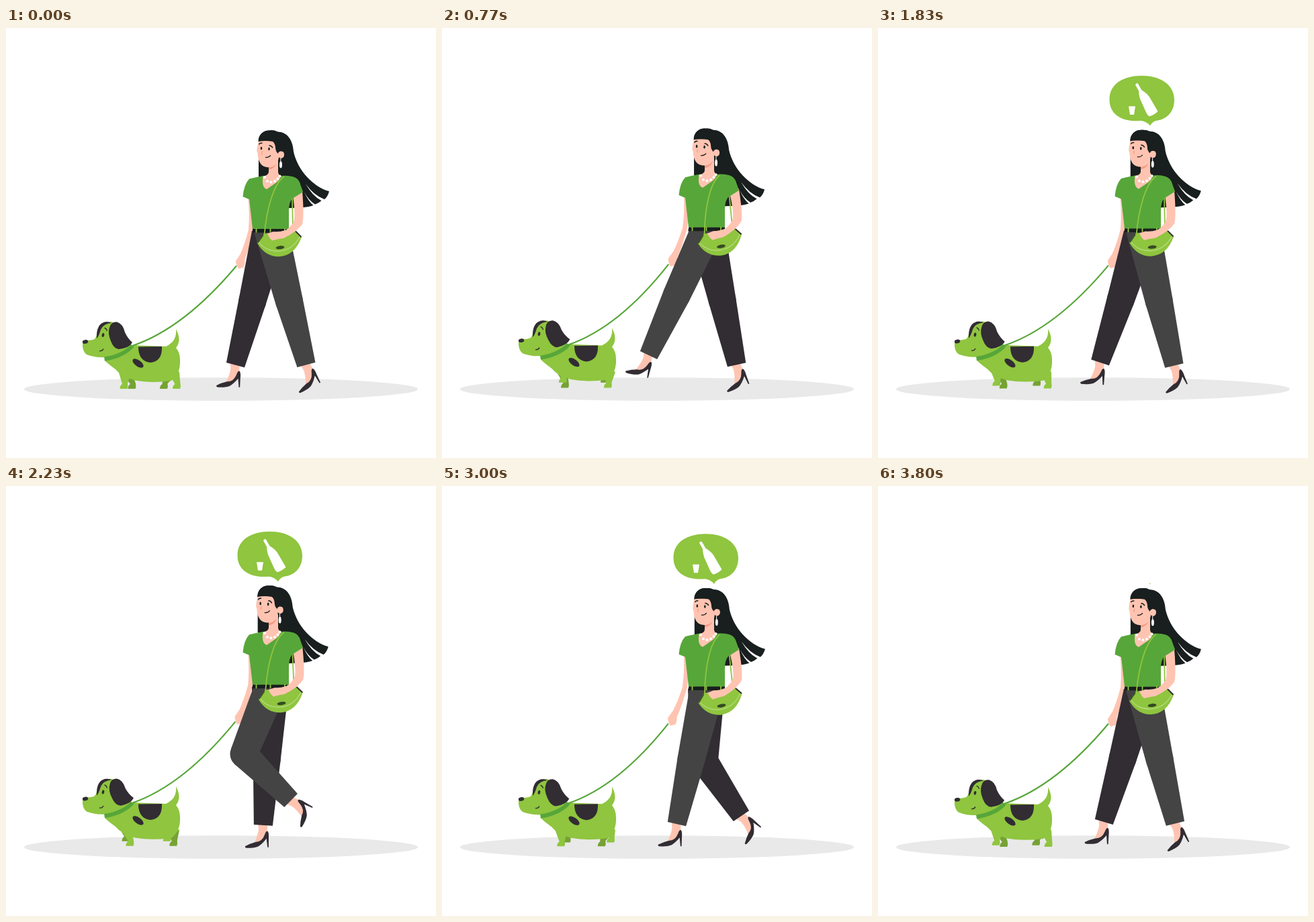
An HTML page with a canvas that plays this animation: 640 by 640 pixels, repeating every 3.83 s.

```html
<!DOCTYPE html>
<html lang="en">
<head>
<meta charset="utf-8">
<title>Walking the dog</title>
<style>
  html, body { margin: 0; width: 100%; height: 100%; overflow: hidden; background: #fff; }
  canvas { display: block; width: 100%; height: 100%; }
</style>
</head>
<body>
<canvas id="stage" width="640" height="640"></canvas>
<script>
const ctx = document.getElementById('stage').getContext('2d');
const LOOP = 3830, POSES = 96, STRIDE = LOOP / 2;
const GREEN = '#57a639', LIME = '#8fc53f', OLIVE = '#76a233', SKIN = '#ffc4b1', BLUSH = '#f79a86',
      HAIR = '#191e1e', DARK = '#322c33', GREY = '#444444', WHITE = '#fff';
const TAU = Math.PI * 2, RAD = Math.PI / 180;

function fill(color, path) {
  ctx.fillStyle = color;
  ctx.fill(new Path2D(path));
}
function line(color, width, path) {
  ctx.strokeStyle = color;
  ctx.lineWidth = width;
  ctx.stroke(new Path2D(path));
}
function oval(color, x, y, rx, ry = rx, angle = 0) {
  ctx.fillStyle = color;
  ctx.beginPath();
  ctx.ellipse(x, y, rx, ry, angle * RAD, 0, TAU);
  ctx.fill();
}
function poly(color, points) {
  fill(color, 'M' + points.map(p => p.join()).join('L') + 'Z');
}
function group(draw, x, y, angle = 0, px = 0, py = 0) {
  ctx.save();
  ctx.translate(x + px, y + py);
  ctx.rotate(angle * RAD);
  ctx.translate(-px, -py);
  draw();
  ctx.restore();
}
const wrap = x => x - Math.floor(x);
const smooth = x => { x = Math.min(1, Math.max(0, x)); return x * x * (3 - 2 * x); };

// Stride phase, then thigh, shin and foot angles; positive swings forward (left).
const GAIT = [
  [0, -15, -15, -26], [.06, -7, -27, -41], [.167, 22.2, -45.4, -61], [.28, 25, -27, -37],
  [.34, 28, 3, -10], [.396, 25, 25, 14], [.509, 16.4, 16.4, 2], [.697, 3.1, 3.1, -1],
  [.75, -1, -1, 0], [.926, -12.6, -12.6, -21], [.979, -13.7, -13.7, -25]
];
function gaitKey(i) {
  const n = GAIT.length, turns = Math.floor(i / n), key = GAIT[i - turns * n];
  return [key[0] + turns, ...key.slice(1)];
}
// Monotone cubic interpolation round the cycle.
function gait(phase) {
  let i = GAIT.length - 1;
  while (GAIT[i][0] > phase) i--;
  const [k0, k1, k2, k3] = [-1, 0, 1, 2].map(d => gaitKey(i + d));
  const h = k2[0] - k1[0], s = (phase - k1[0]) / h;
  const slope = (a, b, c, j) => {
    const m = (b[j] - a[j]) / (b[0] - a[0]), n = (c[j] - b[j]) / (c[0] - b[0]);
    return m * n <= 0 ? 0 : 2 * m * n / (m + n);
  };
  return [1, 2, 3].map(j => {
    const m1 = slope(k0, k1, k2, j) * h, m2 = slope(k1, k2, k3, j) * h, d = k2[j] - k1[j];
    return k1[j] + s * (m1 + s * (3 * d - 2 * m1 - m2 + s * (m1 + m2 - 2 * d)));
  });
}

function drawFoot() {
  fill(SKIN, 'M-8,-5L6,-5L6,10Q3,18 -3,25L-14,27Q-7,12 -7,5Z');
  fill(DARK, 'M-27.5,31Q-20,27 -12,25Q-2,25 2,14Q4,8 6.5,9Q8.5,12 7.8,19L7.5,33H5.8L4.5,20Q-2,28 -8,31.5Q-14,34 -26,33.5Q-28,33 -27.5,31Z');
}
function drawLeg(color, waistLeft, hipY, phase) {
  const [thigh, shin, foot] = gait(phase);
  const step = ([x, y], angle, length) =>
    [x - Math.sin(angle * RAD) * length, y + Math.cos(angle * RAD) * length];
  const sides = (p, angle, half) => [step(p, angle + 90, half), step(p, angle - 90, half)];
  const knee = step([394, hipY], thigh, 106), ankle = step(knee, shin, 98.5);
  group(drawFoot, ...ankle, foot);
  const [kneeL, kneeR] = sides(knee, thigh, 20.5);
  poly(color, [[waistLeft, hipY - 2], kneeL, kneeR, [421, hipY - 2]]);
  const [topL, topR] = sides(knee, shin, 20.5), [cuffL, cuffR] = sides(ankle, shin, 14);
  poly(color, [topL, cuffL, cuffR, topR]);
  oval(color, ...knee, 20.5);
}

function drawBackHair() {
  fill(HAIR, 'M376,170C375,158 384,152 393,152.5Q400,152 404,154.5C419,154.5 427,167 428,184C434,212 458,237 481,243Q479,251 474,255Q458,249 446,232Q456,250 469.5,257Q465,261 460,262.5Q450,256 444,244Q450,258 457.5,264Q450,267.5 421,268L400,230L376,222Z');
}
function drawFace() {
  fill(SKIN, 'M376,168Q374,176 373.5,181Q373,184 374.5,186C375,199 380,207.5 391,207.5C401,207 405,200 406,193L406,184L402,179L400,168Z');
  oval(SKIN, 409.5, 188.5, 4.6, 5.5);
  fill(HAIR, 'M375.5,169C375.5,158 384,152 393,152.5Q400,152 404,154.5C418,156 423,167 423,184L412,184Q406,182 405,187Q401,184 401,177Q400,171 397,169Q386,167 375.5,169Z');
  oval(HAIR, 380, 179, 1.3, 2.3);
  oval(HAIR, 391.5, 180, 1.3, 2.3);
  line(HAIR, 1.5, 'M376.5,173.5Q378,170.5 381.5,171.5M391.5,175Q395,174.5 397,178.5');
  line(BLUSH, 1.2, 'M382,183Q379.5,187 382,188');
  line(HAIR, 1.2, 'M386,192.5Q391,193.5 394,189.5');
  line(WHITE, 1, 'M408.8,194V200');
  oval(WHITE, 409, 203.5, 2, 5);
}
function drawBackArm() {
  fill(SKIN, 'M360,248Q363,275 361,300Q356,320 349,336L342,347Q342,352 346,358.5L354,356Q356,350 355.5,344Q361,331 368,300L371,248Z');
}
function drawShirt() {
  fill(HAIR, 'M367,298H421V304.5H367Z');
  fill(GREEN, 'M362,224.5Q372,222 383,220H410Q420,219 428,221.5Q436,224 438,233L442,244L426,254Q421,260 421,272V299H367L362,255L352.5,251Q354,233 362,224.5Z');
  line(LIME, 1.8, 'M372.5,298V304.5M393.5,298V304.5M415,298V304.5');
  fill(SKIN, 'M391,202L405,194V215Q406,219 409,221Q406,228 401,231L388,240Q380,237 382.5,221Q391,219 391,214Z');
  fill(BLUSH, 'M391,207Q399,206 403,200Q401,209 391,211Z');
  for (const [x, y] of [[385, 222], [389, 228], [394.5, 229.5], [400, 228], [404.5, 224.5], [407.5, 220.5]])
    oval(WHITE, x, y, 2);
}
function drawBag() {
  line(LIME, 1.8, 'M414,221C398,232 388,270 384.5,308M426,252L427,303');
  fill(LIME, 'M384,306L374,320Q385,340 406,340.3Q430,339 440,311L431,302Z');
  line('#b9dc84', 1.2, 'M376,318C388,337 423,339 437,311');
  line(DARK, 2, 'M431,302.5L439.5,311');
  line('#38551f', 1.5, 'M383,308L375,319.5');
  oval('#354b22', 408, 326.7, 6.5, 2.5, -6);
  fill(SKIN, 'M427,250Q431,277 428.5,288Q424,296 416,301Q406,304 398,303L389,306Q392,313 396,316.2Q405,314 413,313Q432,304 441,292Q444,280 441,243Z');
}
function drawSleeve() {
  fill(GREEN, 'M418,226Q436,222 438,233L442,244L426,254L418,256Z');
}

const BUBBLE = 'M-60.5,-39C-60.5,-63 -39,-74.5 -12.5,-74.5C14,-74.5 36,-62 36,-38.5C36,-19 23,-9 9,-7.5Q3,-6 0,0Q-5,-6.5 -14,-7.5C-42,-5 -60.5,-17 -60.5,-39Z';
const BOTTLE = 'M-22,-61Q-20.5,-64.5 -18,-62.5L-12.5,-53Q-4,-48 -0.5,-42L11.5,-21.5Q6,-16 -1,-14Q-3.5,-15 -6,-20L-15,-40Q-17,-47 -17,-52Z';
function drawBubble(y, scale) {
  ctx.save();
  ctx.translate(405, y);
  ctx.scale(scale, scale);
  fill(LIME, BUBBLE);
  fill(WHITE, BOTTLE);
  fill(WHITE, 'M-32,-29H-22L-24,-16.5H-30Z');
  ctx.restore();
}

function drawPaw(color, hip, foot, ground) {
  const y = ground;
  fill(color, `M${hip - 11},503L${foot - 3},${y - 7}Q${foot - 6.5},${y - 5} ${foot - 6.5},${y}H${foot + 4.5}Q${foot + 6},${y - 3} ${foot + 5},${y - 8}L${hip + 11},512Z`);
}
function drawPaws(color, phase, lift) {
  const c = Math.cos(phase * TAU), s = Math.sin(phase * TAU), ground = 537 - lift * 1.7;
  drawPaw(color, 176, 182 - 6 * c, ground - 8 * Math.max(0, -s));
  drawPaw(color, 247, 245 + 9.5 * c, ground - 8 * Math.max(0, s));
}
function drawDogBody() {
  fill(LIME, 'M186,472L238,474Q255,466 253,448Q262,465 253,476Q259,483 259,494Q260,515 246,525Q215,529 192,524.5Q172,519 163,508Q152,500 147,495L166,484Z');
  fill(DARK, 'M197,474.5L232,474Q233,496 215,498Q197,496 197,474.5Z');
  oval(DARK, 196.5, 499, 9.5, 4.5, 36);
}
function drawDogHead(flap) {
  fill(LIME, 'M114,468Q113,481 120,486Q132,491 149,490Q174,488 187,472L170,445L158,437.5Q144,436 137,448Q135,461 131,463.5Q125,465 120,465Z');
  fill(DARK, 'M135,462Q134,441 147,437.5Q153,436.5 157,439Q145,440 141,449Q138,459 135,462Z');
  oval(DARK, 118, 467, 4.2, 2.8, -10);
  oval(DARK, 144.5, 457, 1.8, 3, 8);
  line(DARK, 1.3, 'M146.5,446.5Q149.5,447 150.5,451M139,480.5Q143,481.5 145,477.5');
  line(GREEN, 6, 'M146.5,492.5C165,490 181,482 188,473');
  group(() => fill(DARK, 'M154,446Q156,437 165,437.5Q174,440 177,453Q181,462 188,468Q184,476 168,478Q160,477 156,466Q151,454 154,446Z'),
    0, 0, flap, 160, 442);
}

function draw(time) {
  const phase = wrap(time / STRIDE), swing = 1 - Math.cos(phase * TAU);
  const rise = (1 - Math.cos((phase - .015) * 2 * TAU)) / 2;
  const body = -5 * rise, headX = -2 * rise, headY = -6.2 * rise;
  const dogPhase = wrap(phase * 2), dogRise = (1 - Math.cos(dogPhase * 2 * TAU)) / 2;

  fill(WHITE, 'M0,0H640V640H0Z');
  oval('#e9e9e9', 320, 537.5, 293, 17.3);

  group(drawBackHair, headX, headY);
  group(drawBackArm, 0, body, 1.7 * swing, 365, 245);
  drawLeg(DARK, 366, 304 + body, wrap(phase + .53));
  drawLeg(GREY, 368.5, 304 + body, phase);
  group(drawShirt, 0, body);
  group(drawFace, headX, headY);
  group(drawBag, 0, body, -2.5 * swing, 420, 232);
  group(drawSleeve, 0, body);

  const shown = smooth((time - 1530) / 230) * smooth((3810 - time) / 235);
  if (shown > 0) drawBubble(146.3 + headY, shown);

  drawPaws(OLIVE, dogPhase + .5, dogRise);
  drawPaws(LIME, dogPhase, dogRise);
  group(drawDogBody, 0, -1.5 * dogRise);
  group(() => drawDogHead(-6 * dogRise), 0, -2 * dogRise);
  line(GREEN, 2.2, `M188,${473 - 1.5 * dogRise}Q${265 - swing},${447 + body / 2} ${343 - 3.2 * swing},${354 + body}`);
}

// The motion advances in held poses, 48 to a stride.
function tick() {
  const pose = Math.floor(performance.now() % LOOP / LOOP * POSES + .25) % POSES;
  draw(pose * LOOP / POSES);
  requestAnimationFrame(tick);
}
tick();
</script>
</body>
</html>
```
